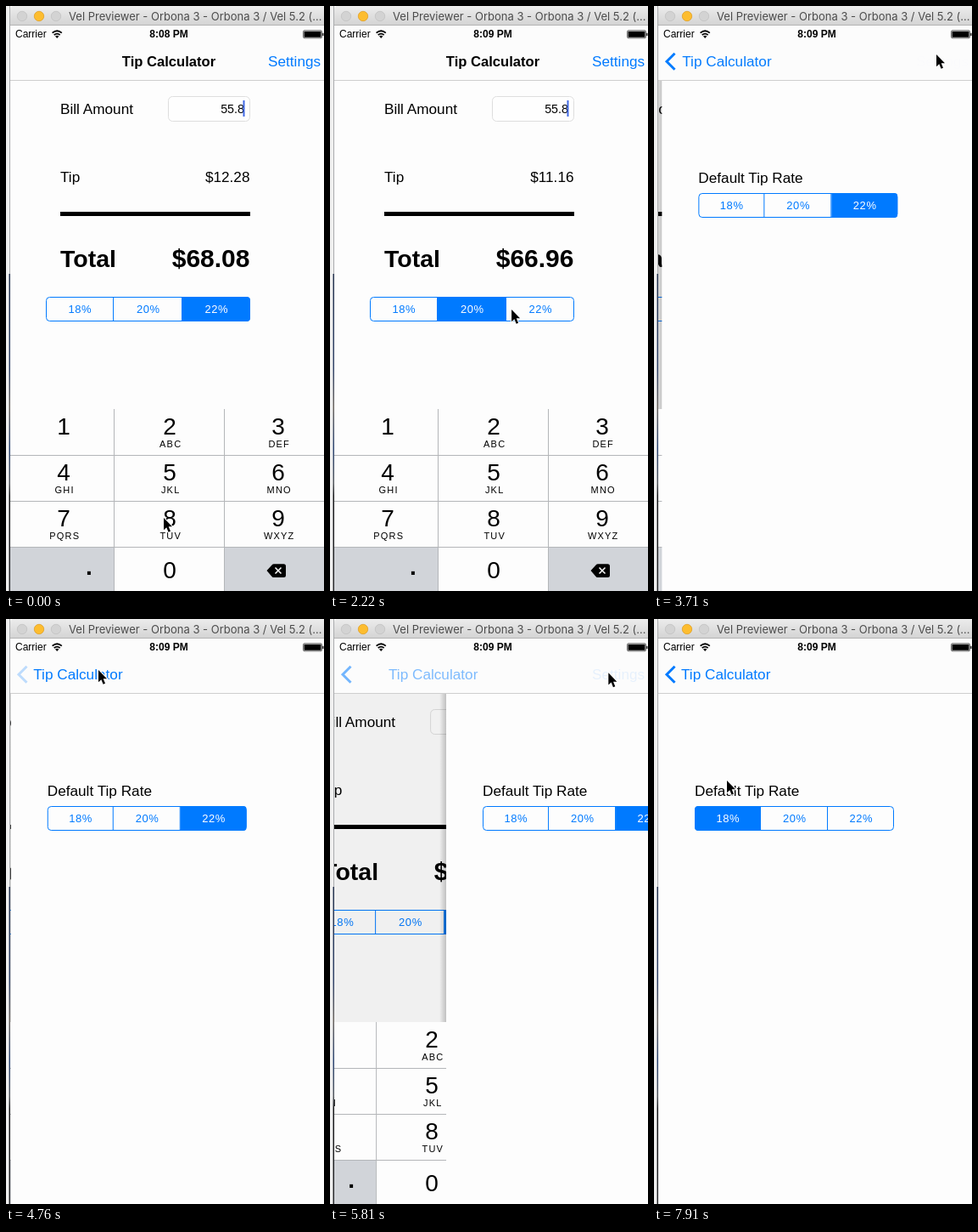
An HTML page that plays this animation: 375 px wide and 688 px high, repeating every 8 s.

```html
<!DOCTYPE html>
<html lang="en">
<head>
<meta charset="utf-8">
<title>Tip Calculator</title>
<style>
  html, body { margin: 0; width: 100%; height: 100%; overflow: hidden; background: #fdfdfd; }
  svg { display: block; width: 100%; height: 100%; }
  text { font-family: "Liberation Sans", Arial, sans-serif; font-size: 17.2px; white-space: pre; }
  .bold { font-weight: bold; }
  .head { font-size: 16.6px; }
  .small { font-size: 12px; }
  .mid { text-anchor: middle; }
  .end { text-anchor: end; }
  .blue { fill: #007aff; }
  .pct { font-size: 13px; letter-spacing: .6px; }
  .digit { font-size: 28px; }
  .abc { font-size: 11px; letter-spacing: 1.2px; }
  .bar { font-family: Inter, "Liberation Sans", sans-serif; font-size: 13px; fill: #4c4c4c; }
</style>
</head>
<body>
<svg id="stage" viewBox="0 0 375 688" xmlns="http://www.w3.org/2000/svg"></svg>
<script>
const LOOP = 8000, WIDTH = 375, BLUE = '#007aff', PAPER = '#fdfdfd';
const stage = document.getElementById('stage');
const $ = id => document.getElementById(id);
const clamp = v => Math.max(0, Math.min(1, v));

const label = (x, y, str, cls = '', id = '') =>
  `<text x="${x}" y="${y}" class="${cls}"${id ? ` id="${id}"` : ''}>${str}</text>`;
const box = (x, y, w, h, fill, more = '') =>
  `<rect x="${x}" y="${y}" width="${w}" height="${h}" fill="${fill}" ${more}/>`;
const line = (d, color, w = 1) =>
  `<path d="${d}" fill="none" stroke="${color}" stroke-width="${w}"/>`;

// Segmented control with edges e[0..3] and top y
function segments(id, e, y) {
  let out = `<clipPath id="${id}Clip">${box(e[0], y, e[3] - e[0], 29, '#000', 'rx="4"')}</clipPath>`;
  ['18%', '20%', '22%'].forEach((str, i) => {
    out += box(e[i], y, e[i + 1] - e[i], 29, BLUE, `id="${id}Fill${i}" clip-path="url(#${id}Clip)"`);
    out += label((e[i] + e[i + 1]) / 2 + .3, y + 19, str, 'pct mid', id + 'Text' + i);
  });
  out += box(e[0] + .5, y + .5, e[3] - e[0] - 1, 28, 'none', `rx="4" stroke="${BLUE}"`);
  return out + line(`M${e[1] - .5} ${y}v29M${e[2] - .5} ${y}v29`, BLUE);
}

function keypad() {
  const letters = ['', 'ABC', 'DEF', 'GHI', 'JKL', 'MNO', 'PQRS', 'TUV', 'WXYZ'];
  const cols = [68, 193, 321];
  let out = box(5, 474, 375, 214, PAPER) + box(5, 636, 122, 52, '#d1d4d9') + box(258, 636, 122, 52, '#d1d4d9');
  letters.forEach((str, i) => {
    const x = cols[i % 3], y = 504 + 54 * Math.floor(i / 3);
    out += label(x, y, i + 1, 'digit mid') + label(x + 1.2, y + 15, str, 'abc mid');
  });
  out += label(193, 673, '0', 'digit mid') + label(98, 669, '.', 'digit bold mid');
  out += line('M5 528.5H380M5 582.5H380M5 636.5H380M127.5 474V688M257.5 474V688', '#b4b6b9');
  out += '<path d="M307.500 664l6-6.500q1-1.200 2.500-1.200h11.500q2.500 0 2.500 2.500v10.800q0 2.500-2.500 2.500H316q-1.500 0-2.500-1.200z"/>';
  return out + line('M317.500 660.500l7 7m0-7l-7 7', '#fff', 1.5);
}

const calculator = label(64, 127, 'Bill Amount')
  + box(191.5, 106.5, 96, 29, '#fefefe', 'rx="5" stroke="#dedede"')
  + '<text x="281" y="126" class="end" style="font-size:14.3px">55.8</text>'
  + box(279.5, 111, 2, 19, '#4069e5', 'id="caret"')
  + label(64, 207, 'Tip') + label(287.5, 207, '', 'end', 'tip')
  + box(64, 242, 224, 5, '#000')
  + '<text x="64" y="307" class="bold" style="font-size:28.5px">Total</text>'
  + '<text x="287.5" y="306.500" class="bold end" style="font-size:30px" id="total"></text>'
  + segments('main', [47, 127, 208, 288], 342);

const settings = box(5, 88, 375, 600, PAPER) + label(48, 208, 'Default Tip Rate')
  + segments('pref', [48, 126, 205, 283], 220);

const battery = box(350.5, 28.8, 22, 9, 'none', 'rx="1.5" stroke="#000" stroke-width=".6"')
  + box(351.5, 29.8, 20, 7, '#000') + box(373.3, 31.8, 1.2, 3.2, '#000');

const navBar = box(5, 23, 370, 65, '#fcfcfc') + line('M5 87.500H375', '#cfcfcf')
  + label(11, 37, 'Carrier', 'small') + label(192, 37, '', 'small bold mid', 'clock')
  + line('M54.600 31.600q5.600-4.800 11.200 0', '#000', 1.8) + line('M56.700 34q3.500-2.900 7 0', '#000', 1.7)
  + '<path d="M58 35.500q2.200-1.500 4.400 0l-2.200 2.500z"/>' + battery
  + label(192, 71, 'Tip Calculator', 'head bold mid', 'title')
  + label(309, 71, 'Settings', 'blue', 'link')
  + `<g id="chevron">${line('M24.500 55.800L15 65.300L24.500 74.800', BLUE, 3)}</g>`
  + label(32, 71, 'Tip Calculator', 'blue', 'back');

const windowFrame = box(0, 0, 5, 688, '#f0f0f0') + box(4, 0, 1, 315, '#a9abad')
  + box(3.5, 315, 1.5, 373, 'url(#desk)')
  + '<path d="M5 23V4q0-4 4-4H375V23z" fill="url(#metal)"/>' + line('M5 22.500H375', '#b4b4b4')
  + [[19, '#d3d3d3', '#c2c2c2'], [39, '#fdbd2f', '#e0a028'], [59, '#d3d3d3', '#c2c2c2']]
    .map(([x, f, s]) => `<circle cx="${x}" cy="12" r="5.700" fill="${f}" stroke="${s}" stroke-width=".8"/>`).join('')
  + label(74, 17, 'Vel Previewer - Orbona 3 - Orbona 3 / Vel 5.2 (...', 'bar');

const stops = list => list.map(([o, c, a = 1]) =>
  `<stop offset="${o}" stop-color="${c}" stop-opacity="${a}"/>`).join('');

stage.innerHTML = `<defs>
  <linearGradient id="metal" x2="0" y2="1">${stops([[0, '#ececec'], [1, '#d3d3d3']])}</linearGradient>
  <linearGradient id="desk" x2="0" y2="1">${stops([[0, '#26344f'], [.3, '#33456a'], [.42, '#6b655f'], [.55, '#2e4774'], [.66, '#54585e'], [.7, '#17181b'], [1, '#2a2b2e']])}</linearGradient>
  <linearGradient id="fade">${stops([[0, '#000', 0], [1, '#000', .3]])}</linearGradient>
  <clipPath id="screen"><rect x="5" y="23" width="370" height="665"/></clipPath></defs>
  ${box(0, 0, 375, 688, PAPER)}
  <g clip-path="url(#screen)">
    <g id="calc">${calculator}</g>
    ${box(5, 88, 375, 386, '#000', 'id="dim"')}
    ${box(-3, 88, 8, 600, 'url(#fade)', 'id="shadow"')}
    <g id="keys">${keypad()}</g>
    <g id="prefs">${settings}</g>
    ${navBar}
  </g>
  ${windowFrame}
  <path id="cursor" d="M0 0V14.200L3.300 11.200L5.600 16.800L8 15.800L5.700 10.300H10z" stroke="#fff" stroke-width="2" paint-order="stroke"/>`;

// Pointer path: time, x, y
const path = [
  [0, 186, 602], [150, 198, 590], [590, 326, 455], [890, 210, 385], [1180, 121, 355],
  [1475, 121, 355], [1770, 160, 357], [2065, 172, 357], [2212, 214, 357], [2360, 242, 358],
  [2510, 246, 358], [2660, 262, 300], [2960, 326, 78], [3110, 333, 57], [4010, 333, 57],
  [4460, 130, 70], [4610, 109, 60], [4910, 109, 60], [5360, 322, 68], [5510, 329, 64],
  [5960, 328, 63], [6110, 315, 62], [6410, 178, 57], [6710, 112, 150], [7010, 93, 234],
  [7760, 93, 234], [7910, 86, 190]
];

function pointer(t) {
  let i = 1;
  while (i < path.length - 1 && path[i][0] < t) i++;
  const [t0, x0, y0] = path[i - 1], [t1, x1, y1] = path[i];
  const k = clamp((t - t0) / (t1 - t0));
  return [x0 + (x1 - x0) * k, y0 + (y1 - y0) * k];
}

const pace = t => t < 2360 ? Math.floor(t / 147.5) * 147.5 : 2360 + Math.floor((t - 2360) / 150) * 150;

function spring(ms) {
  if (ms <= 0) return 0;
  const a = ms * .013, p = 1 - (1 + a) * Math.exp(-a);
  return p > .9972 ? 1 : p;
}

// Weight of each choice after taps given as [time, index]
function choices(t, first, taps) {
  let w = [0, 0, 0];
  w[first] = 1;
  for (const [at, i] of taps) {
    if (t < at) break;
    const k = t < at + 140 ? 0 : t < at + 290 ? .65 : 1;
    w = w.map((v, j) => j === i ? Math.max(k, .15) : v * (1 - k));
  }
  return w;
}

function paintSegments(id, weights) {
  weights.forEach((w, i) => {
    $(id + 'Fill' + i).setAttribute('opacity', w);
    const k = w < .3 ? 0 : w;
    $(id + 'Text' + i).setAttribute('fill', `rgb(${255 * k},${122 + 133 * k},255)`);
  });
}

const move = (id, x, y = 0) => $(id).setAttribute('transform', `translate(${x} ${y})`);
const alpha = (id, a) => $(id).setAttribute('opacity', clamp(a));
const money = v => '$' + v.toFixed(2);

function draw(time) {
  const t = pace(time);
  const popping = t >= 4755 && t < 5640;
  const p = t >= 5640 ? spring(t - 5640) : popping ? 1 - spring(t - 4755) : spring(t - 3213);

  const main = choices(t, 2, [[1327, 0], [1769, 1], [2359, 2]]);
  paintSegments('main', main);
  paintSegments('pref', choices(t, 2, [[7310, 0]]));
  const rate = [.18, .2, .22][main.indexOf(Math.max(...main))];
  $('tip').textContent = money(55.8 * rate);
  $('total').textContent = money(55.8 * (1 + rate));
  $('clock').textContent = t < 1327 ? '8:08 PM' : '8:09 PM';
  alpha('caret', t < 3110 && t % 1000 < 500 ? 1 : 0);

  const edge = WIDTH * (1 - p);
  move('calc', -.3 * WIDTH * p);
  move('keys', -.3 * WIDTH * p);
  move('prefs', edge);
  move('shadow', edge);
  alpha('shadow', p > 0 && p < 1 ? 1 - p * .5 : 0);
  alpha('dim', p < 1 ? .08 * p : 0);

  move('title', -72 * p);
  alpha('title', 1 - 2.5 * p);
  alpha('link', p === 0 ? 1 : popping ? (1 - p) ** 3 : .23 * (1 - p));
  alpha('chevron', p ** 1.4 * (popping ? .25 : 1));
  move('back', 105 * (1 - p));
  alpha('back', (p - .3) / .7);

  move('cursor', ...pointer(t));
}

const start = performance.now();
function tick() {
  draw((performance.now() - start) % LOOP);
  requestAnimationFrame(tick);
}
tick();
</script>
</body>
</html>
```
